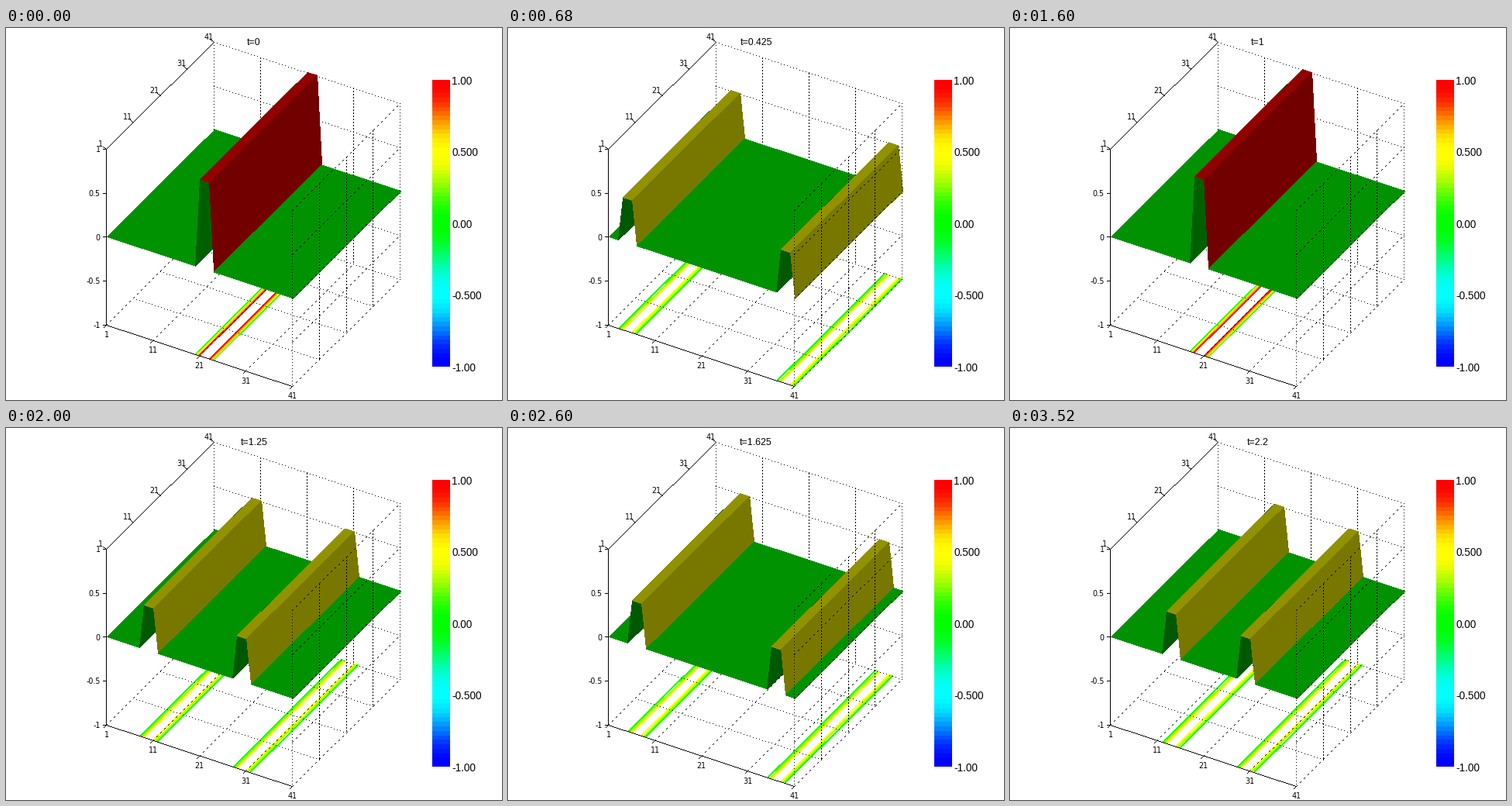
A matplotlib script for the animation above (3.56 s loop, 640 by 480 pixels).

```python
import numpy as np
import matplotlib.pyplot as plt
from matplotlib.animation import FuncAnimation
from matplotlib.collections import LineCollection, PolyCollection
from matplotlib.patches import Rectangle

W, H, DPI = 640, 480, 80
PX = 72 / DPI                      # points per pixel
N = 41                             # grid points per side
FRAMES, INTERVAL, DT = 89, 40, 0.025
LEVELS = (0.1, 0.3, 0.5, 0.7, 0.9)
TICKS = (1, 11, 21, 31, 41)
HEIGHTS = (-1, -0.5, 0, 0.5, 1)
# stipple patterns: pixels on, pixels off
SOLID, SPARSE, DASHED, LONG = (1, 0), (1, 3), (2, 2), (2, 3)
BACK, FLOOR, FRONT = 1, 3, 6       # stacking of the line layers

fig = plt.figure(figsize=(W / DPI, H / DPI), dpi=DPI, facecolor="white")
ax = fig.add_axes([0, 0, 1, 1])
ax.set_xlim(0, W)
ax.set_ylim(H, 0)
ax.axis("off")

layers = {BACK: [], FLOOR: [], FRONT: []}


def project(i, j, z):
    """Parallel projection of a grid point to stage pixels."""
    x = 130.6 + 6 * (i - 1) + 3.475 * (j - 1)
    y = 382.9 + 1.98 * (i - 1) - 3.45 * (j - 1) - 113.5 * (z + 1)
    return x, y


def rainbow(value):
    """Blue-to-red hue ramp on [-1, 1], smoothed by an S-curve."""
    v = (value + 1) / 2
    rgb = np.clip([4 * v - 2, min(4 * v, 4 - 4 * v), 2 - 4 * v], 0, 1)
    return 0.5 * (1 - np.cos(np.pi * rgb))


def segment(p, q, pattern=SOLID, layer=FRONT):
    """Stippled line, one pixel wide, without smoothing."""
    p, q = np.array(p), np.array(q)
    on, off = pattern
    count = int(round(np.abs(q - p).max()))
    k = np.arange(count + 1)
    k = k[k % (on + off) < on]
    points = p + (q - p) * k[:, None] / count
    layers[layer].extend(np.floor(points + (-1, 0.5)))


def edge(a, b, pattern=SOLID, layer=FRONT):
    segment(project(*a), project(*b), pattern, layer)


def label(x, y, s, size, font, ha="center"):
    return ax.text(x, y + 0.36 * size, s, fontsize=size * PX, family=font,
                   ha=ha, va="baseline", color="black", zorder=9)


def draw_box():
    for t in TICKS:
        upright = SPARSE if t in (1, N) else DASHED
        if t > 1:
            edge((1, t, -1), (N, t, -1), SPARSE, FLOOR)
        edge((t, 1, -1), (t, N, -1), LONG, FLOOR)
        edge((t, N, 1), (t, N, -1), upright, BACK)
        edge((N, t, 1), (N, t, -1), upright, FRONT)
    for h in HEIGHTS:
        edge((1, N, h), (N, N, h), SPARSE, BACK)
        edge((N, 1, h), (N, N, h), LONG, FRONT)
    edge((1, 1, -1), (1, 1, 1))
    edge((1, 1, -1), (N, 1, -1))
    edge((1, 1, 1), (1, N, 1))


def draw_ticks(font="DejaVu Sans", size=9.5):
    for t in TICKS:
        x, y = project(t, 1, -1)
        segment((x - 3, y + 3), (x, y))
        label(x - 0.9, y + 12.8, str(t), size, font)
        x, y = project(1, t, 1)
        segment((x - 4, y - 3), (x, y))
        label(x - 8.6, y - 6.4, str(t), size, font)
    for h in HEIGHTS:
        x, y = project(1, 1, h)
        segment((x - 4, y), (x, y))
        label(x - 9, y + 0.8, f"{h:g}", size, font, "right")


def ink_layers():
    corners = np.array([(0, 0), (1, 0), (1, 1), (0, 1)])
    for z, points in layers.items():
        dots = np.unique(points, axis=0)
        ax.add_collection(PolyCollection(
            dots[:, None, :] + corners, facecolors="black", linewidths=0,
            antialiaseds=False, zorder=z))


def draw_colorbar(bands=64, top=67, height=370):
    step = height / bands
    for k in range(bands):
        color = rainbow(1 - 2 * k / (bands - 1))
        ax.add_patch(Rectangle((550, top + k * step), 23, step, fc=color,
                               lw=0, antialiased=False))
    for k, s in enumerate(("1.00", "0.500", "0.00", "-0.500", "-1.00")):
        label(575.5, 68 + k * height / 4, s, 13.6, "Liberation Sans", "left")


def pulse(i):
    """Initial hump, mirrored at both ends of the domain."""
    k = (i - 1) % (2 * (N - 1))
    k = np.minimum(k, 2 * (N - 1) - k)
    return ((k >= 20) & (k <= 22)).astype(float)


def wave(n):
    i = np.arange(1, N + 1)
    return 0.5 * (pulse(i - n) + pulse(i + n))


def shade(rise):
    if rise > 0:
        return 0.315 + 0.06 * rise
    if rise < 0:
        return 0.49 + 0.04 * rise
    return 0.573


draw_box()
draw_ticks()
ink_layers()
draw_colorbar()
contours = ax.add_collection(
    LineCollection([], linewidths=0.75 * PX, antialiaseds=False, zorder=2))
surface = ax.add_collection(
    PolyCollection([], linewidths=0, antialiaseds=False, zorder=5))
title = label(320, 17.5, "", 12.4, "Liberation Sans")


def update(n):
    u = wave(n)
    strips, fills, lines, inks = [], [], [], []
    # strips run from far left to near right, so later ones cover earlier ones
    for i, (a, b) in enumerate(zip(u[:-1], u[1:]), start=1):
        strips.append([project(i, 1, a), project(i + 1, 1, b),
                       project(i + 1, N, b), project(i, N, a)])
        fills.append(rainbow(a) * shade(b - a))
        for level in LEVELS:
            if min(a, b) < level <= max(a, b):
                x = i + (level - a) / (b - a)
                lines.append([project(x, 1, -1), project(x, N, -1)])
                inks.append(rainbow(level))
    surface.set_verts(strips)
    surface.set_facecolor(fills)
    contours.set_segments(lines)
    contours.set_color(inks)
    title.set_text(f"t={round(n * DT, 3):g}")
    return surface, contours, title


anim = FuncAnimation(fig, update, frames=FRAMES, interval=INTERVAL, repeat=True)
plt.show()
```
